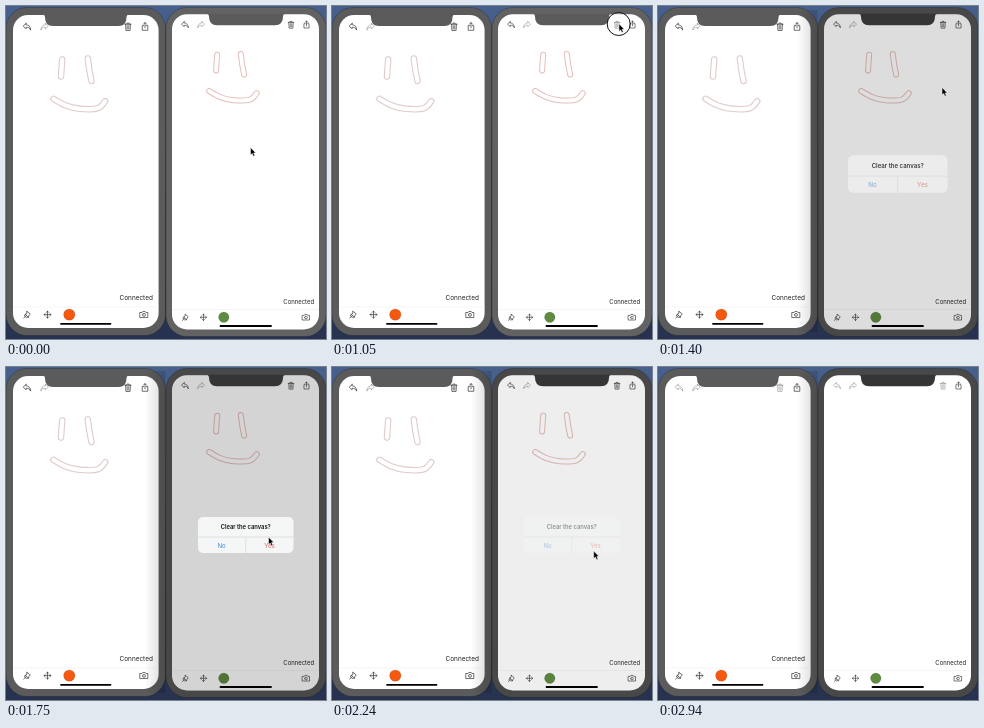
Recreate the animation shown at these times as an HTML page. Size 320 by 333 pixels, loop 3.43 s.

```html
<!DOCTYPE html>
<html lang="en">
<head>
<meta charset="utf-8">
<title>Shared canvas</title>
<style>
html, body { margin: 0; width: 100%; height: 100%; overflow: hidden; background: #34486e; }
svg { display: block; width: 100%; height: 100%; }
text { font-family: Inter, "Open Sans", sans-serif; text-anchor: middle; }
.icon { fill: none; stroke: #333; stroke-width: .8; stroke-linejoin: round; stroke-linecap: round; }
.ink { fill: none; stroke-linecap: round; stroke-linejoin: round; }
</style>
</head>
<body>
<svg id="stage" viewBox="0 0 320 333" preserveAspectRatio="none"></svg>
<script>
const LOOP = 3430, STEP = 70;
const icons = {
  undo: 'M-1-4L-4.4-.8L-1 2.3V.6C1.8.5 3.2 1.4 4.2 3.8C4.2.2 2.4-2.2-1-2.4Z',
  redo: 'M1-4L4.4-.8L1 2.3V.6C-1.8.5-3.2 1.4-4.2 3.8C-4.2.2-2.4-2.2 1-2.4Z',
  trash: 'M-3.5-3H3.5M-1.3-3V-4.3H1.3V-3M-2.8-3L-2.4 4.2H2.4L2.8-3M-.9-1.4V2.6M.9-1.4V2.6',
  share: 'M-1.5-1.4H-3.2V4H3.2V-1.4H1.5M0 1.2V-4.8M-1.8-3L0-4.8L1.8-3',
  brush: 'M0-3.8L3.8-.6L2.2.8L1.6 3L-2-.4L-.4-1.4ZM-.6.8L-3.8 4M-2-.4L-3 1.4L-1 3.2L1.6 3',
  move: 'M-4 0H4M0-4V4M-2.7-1.2L-4 0L-2.7 1.2M2.7-1.2L4 0L2.7 1.2M-1.2-2.7L0-4L1.2-2.7M-1.2 2.7L0 4L1.2 2.7',
  camera: 'M-4.4-2.4H-2.2L-1.4-3.6H1.4L2.2-2.4H4.4V3.4H-4.4ZM-1.7.3A1.7 1.7 0 1 0 1.7.3A1.7 1.7 0 1 0-1.7.3'
};
const smile = 'M56.2 53.5Q55.5 62 55 70.5M81.8 52.5Q83 64 85.5 75M47.5 92.8C55 97.5 61 101.5 74 102.8C92 104.3 94.5 102.5 99.2 95.2';

const icon = (name, x, y, k) =>
  `<path class="icon ${name}" d="${icons[name]}" transform="translate(${x} ${y}) scale(${k * .87})"/>`;

function phone(p) {
  const { id, x, y, w, h, k } = p, right = x + w;
  const row = (names, xs, ry) => names.map((n, i) => icon(n, xs[i], ry, k)).join('');
  return `<g id="${id}">
    <rect x="${p.ox}" y="1.5" width="${p.ow}" height="${p.oh}" rx="21" fill="currentColor" stroke="#0004" stroke-width=".8"/>
    <rect x="${x}" y="${y}" width="${w}" height="${h}" rx="15" fill="#fff"/>
    <g class="drawing" transform="${p.fit}">
      <path class="ink" d="${smile}" stroke="${p.ink}" stroke-width="6.5"/>
      <path class="ink" d="${smile}" stroke="#fff" stroke-width="4.3"/>
    </g>
    ${row(['undo', 'redo', 'trash', 'share'], p.top, p.topY)}
    <path d="M${x} ${p.lineY}H${right}" stroke="#eee" stroke-width=".6"/>
    ${row(['brush', 'move', 'camera'], p.tools, p.toolY)}
    <circle cx="${p.dot}" cy="${p.toolY}" r="${5.7 * k}" fill="${p.color}" stroke="#0003" stroke-width=".6"/>
    <text x="${p.textX}" y="${p.textY}" font-size="${6.45 * k}" fill="#222">Connected</text>
    <rect class="dim" x="${x}" y="${y}" width="${w}" height="${h}" rx="15" opacity="0"/>
    <path d="M${p.bar[0]} ${p.barY}H${p.bar[1]}" stroke="#000" stroke-width="1.8" stroke-linecap="round"/>
    <path class="notch" d="M${p.notch[0] - 3} ${y - .5}q3 0 3 3q0 8.5 8 8.5H${p.notch[1] - 8}q8 0 8-8.5q0-3 3-3z" fill="currentColor"/>
  </g>`;
}

const stage = document.getElementById('stage');
stage.innerHTML = `
  <defs>
    <linearGradient id="desk" x2="0" y2="1"><stop stop-color="#47608c"/><stop offset="1" stop-color="#26324f"/></linearGradient>
    <linearGradient id="fade"><stop stop-opacity="0"/><stop offset="1" stop-opacity=".16"/></linearGradient>
  </defs>
  <rect width="320" height="333" fill="url(#desk)"/>` +
  phone({ id: 'left', ox: 0, ow: 159.5, oh: 328, x: 7, y: 9, w: 145.6, h: 313, k: 1, fit: '', ink: '#e0cbcb',
    top: [21, 38.5, 122, 139], topY: 20.8, tools: [21, 41.5, 138], toolY: 308.6, lineY: 301,
    dot: 63.3, color: '#f5590f', textX: 130.2, textY: 293.5, bar: [55, 104.5], barY: 317.8, notch: [39, 120.5] }) +
  `<rect id="shadow" x="139" y="4" width="20.5" height="322" fill="url(#fade)"/>` +
  phone({ id: 'right', ox: 160, ow: 160, oh: 329, x: 166, y: 8.2, w: 147, h: 315.3, k: .92,
    fit: 'translate(159.5 -.4) scale(.92)', ink: '#e4bfba',
    top: [179, 195, 285, 300.5], topY: 18.8, tools: [179.3, 197.5, 300], toolY: 311.3, lineY: 303.5,
    dot: 217.8, color: '#5f8c40', textX: 292.7, textY: 297.8, bar: [214.5, 265], barY: 320, notch: [203, 277] }) +
  `<g id="alert">
    <g id="panel">
      <rect x="192" y="150" width="95.5" height="36" rx="5" fill="#f5f6f6"/>
      <path id="press" d="M239.7 170H287.5V181q0 5-5 5H239.7z" fill="#dcdcdc"/>
      <path d="M192 170H287.5M239.7 170V186" stroke="#d2d2d2" stroke-width=".6"/>
      <text x="215.5" y="180.8" font-size="6.1" fill="#3f8ed2">No</text>
      <text x="263.5" y="180.8" font-size="6.1" fill="#e0655f">Yes</text>
    </g>
    <text x="239.7" y="162.3" font-size="5.8" font-weight="600" fill="#111">Clear the canvas?</text>
  </g>
  <circle id="tap" cx="286.7" cy="18" r="11.5" fill="#fff6" stroke="#111" stroke-width="1"/>
  <path id="cursor" d="M0 0V7.6L1.7 6.1L2.9 8.8L4.3 8.2L3.1 5.5H5.3Z" stroke="#fff" stroke-width=".5"/>`;

const $ = s => stage.querySelector(s);
const show = (s, on) => $(s).style.display = on ? '' : 'none';
const clamp = v => Math.min(1, Math.max(0, v));
const between = (t, a, b) => clamp((t - a) / (b - a));
const ease = v => v * v * (3 - 2 * v);

// Pointer stops: time, x, y
const stops = [[0, 244.5, 141.5], [560, 283, 23], [910, 287, 17.8], [1260, 287, 17.8], [1540, 281, 145],
  [1750, 262.5, 170], [2100, 263.7, 178.5], [2170, 263.7, 178.5], [2240, 261.7, 184], [2600, 258, 198]];

function pointer(t) {
  const i = stops.findIndex(s => s[0] > t);
  if (i < 0) return stops[stops.length - 1].slice(1);
  const [a, x, y] = stops[i - 1], [b, u, v] = stops[i], p = ease(between(t, a, b));
  return [x + (u - x) * p, y + (v - y) * p];
}

function setCleared(id, p) {
  $(`#${id} .drawing`).style.opacity = 1 - p;
  for (const n of ['undo', 'redo', 'trash'])
    $(`#${id} .${n}`).style.opacity = n === 'redo' ? .45 : 1 - .55 * p;
}

function draw(t) {
  const enter = 1 - (1 - between(t, 1190, 1540)) ** 1.7;
  const leave = t <= 2170 ? 1 : t <= 2240 ? .4 : t <= 2310 ? .1 : 0;
  const shown = enter * leave, focused = t >= 1120;

  $('#right .dim').setAttribute('opacity', .17 * shown);
  $('#alert').style.opacity = shown;
  $('#panel').style.opacity = enter;
  const k = 1 + .2 * (1 - enter);
  $('#alert').setAttribute('transform', `translate(239.7 168) scale(${k}) translate(-239.7 -168)`);
  show('#press', t >= 2100 && t < 2240);
  show('#tap', t >= 1050 && t < 1190);
  show('#shadow', focused);
  $('#left').style.color = '#5b5b5b';
  $('#right').style.color = focused ? '#484848' : '#626262';
  $('#right .notch').style.color = focused ? '#353535' : '#5b5b5b';

  setCleared('right', between(t, 2310, 2450));
  setCleared('left', between(t, 2660, 2800));

  show('#cursor', t < 2600);
  $('#cursor').setAttribute('transform', `translate(${pointer(t)})`);
}

function tick(now) {
  draw(Math.floor(now % LOOP / STEP) * STEP);
  requestAnimationFrame(tick);
}
draw(0);
requestAnimationFrame(tick);
</script>
</body>
</html>
```
